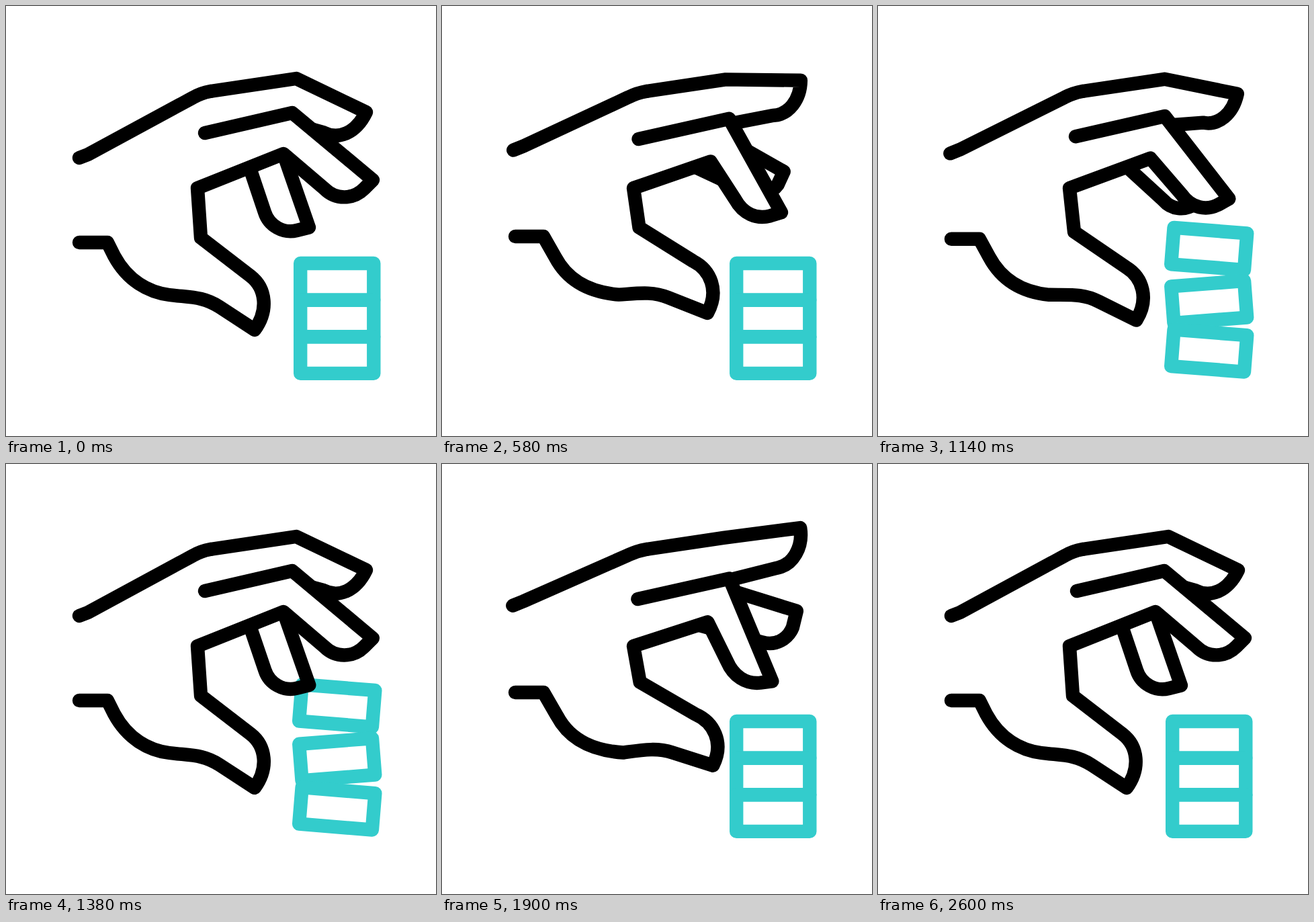
Recreate the animation shown at these times as an HTML page. Size 640x640 px, loop 2820 ms.

```html
<!DOCTYPE html>
<html lang="en">
<head>
<meta charset="utf-8">
<title>Hand stacking blocks</title>
<style>
  html, body { margin: 0; width: 100%; height: 100%; overflow: hidden; background: #fff; }
  svg { display: block; width: 100%; height: 100%; }
  path, rect { fill: none; stroke-width: 20.4; stroke-linejoin: round; }
  path { stroke: #000; }
  rect { stroke: #3cc; }
  .cap { stroke-linecap: round; }
  #palm { fill: #fff; stroke: none; }
</style>
</head>
<body>
<svg viewBox="0 0 640 640">
  <g id="blocks"></g>
  <path id="ring"/>
  <path id="index"/>
  <path id="wrist" class="cap"/>
  <path id="palm"/>
  <path id="hand" class="cap"/>
</svg>
<script>
const LOOP = 2820, STEP = 20, START = 200, SWING = 600;
const $ = id => document.getElementById(id);

// Each part: open pose, pinched pose. Both share the same commands.
const parts = {
  ring: [
    'M362.5 240 L385 307 C391.5 327.5 413 339 433 334 L451 329.5 L413 220',
    'M384 240 L484 262 C505 267 523 254 529 236 L534 210 L413 180'
  ],
  index: [
    'M304 127 L432 108 L536 158 C521 189 495 200 472 188 L447 181',
    'M304 127 L418 110 L533 90 C539 118 525 146 501 152 L430 171'
  ],
  wrist: [
    'M109 226 L122 221 L278 136.5 Q290 129.5 304 127',
    'M105 209.5 L121 203 L277 135.5 Q290 129.5 304 127'
  ],
  hand: [
    'M296 189 L426 159 L546 259 L533 272 C517 288 491 289 474 272 L413 220 L285 271',
    'M291 202 L428 171.5 L487 328.5 L469 330 C447 331 429 318 420 295 L394 236.5 L285 271'
  ]
};
const thumb = [
  ' L290 345 L364 402 C387 420 391 453 370 482 L318 448 C293 432 275 434 243 430' +
  ' C212 426 181 409 161 372 L151 352 L109 352',
  ' L295 323 L378 370 C405 381 423 411 406 446 L345 428 C322 421 300 425 272 429.5' +
  ' C232 427 193 415 172 375 L151 339 L109 339'
];
parts.palm = parts.hand.map(d => d + ' Z');
parts.hand = parts.hand.map((d, i) => d + thumb[i]);

// Resting centre, lift and tilt of each block.
const blocks = [
  { y: 410.3, lift: 50.5, tilt: 4.65 },
  { y: 465, lift: 25.3, tilt: -4.5 },
  { y: 519.6, lift: 6.7, tilt: 4.65 }
];
for (const b of blocks) {
  b.el = document.createElementNS('http://www.w3.org/2000/svg', 'rect');
  const box = { x: -54.55, y: -27.3, width: 109.1, height: 54.6 };
  for (const k in box) b.el.setAttribute(k, box[k]);
  $('blocks').append(b.el);
}

const ease = (t, from, to) => {
  const u = Math.min(1, Math.max(0, (t - from) / (to - from)));
  return u * u * (3 - 2 * u);
};

function morph([a, b], p) {
  const num = /[\d.]+/g, ends = b.match(num);
  let i = 0;
  return a.replace(num, n => (+n + (ends[i++] - n) * p).toFixed(2));
}

function draw(t) {
  let pinch = 0;
  for (let i = 0; i < 4; i++) {
    const from = START + i * SWING;
    pinch += (i % 2 ? -1 : 1) * ease(t, from, from + SWING);
  }
  for (const id in parts) $(id).setAttribute('d', morph(parts[id], pinch));

  const up = ease(t, 800, 1180) - ease(t, 1420, 1800);
  for (const { el, y, lift, tilt } of blocks)
    el.setAttribute('transform', `translate(492.75 ${y - lift * up}) rotate(${tilt * up})`);
}

const t0 = performance.now();
function tick() {
  const t = (performance.now() - t0) % LOOP;
  draw(Math.floor(t / STEP) * STEP);
  requestAnimationFrame(tick);
}
tick();
</script>
</body>
</html>
```
